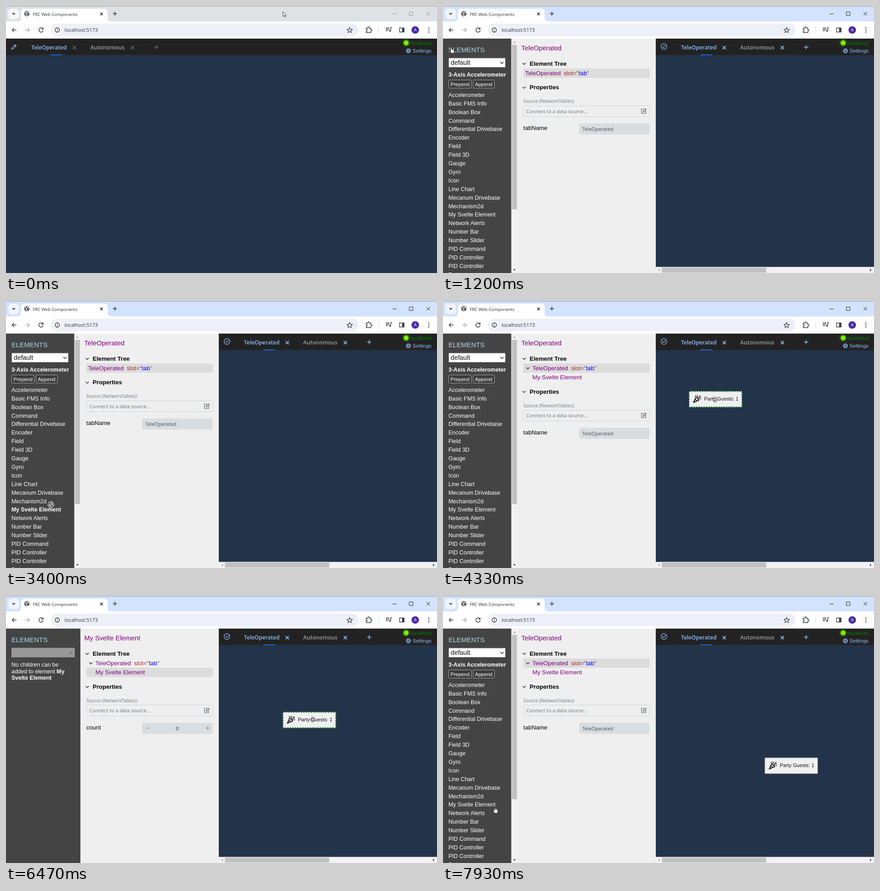
An HTML page that plays this animation: 950 by 590 pixels, repeating every 8 s.

```html
<!DOCTYPE html>
<html lang="en">
<head>
<meta charset="utf-8">
<title>Dashboard editor</title>
<style>
  html, body { margin: 0; width: 100%; height: 100%; overflow: hidden; background: #233349; }
  svg { display: block; width: 950px; height: 590px; }
  text { white-space: pre; font-family: "Liberation Sans", Arial, sans-serif; font-size: 13.1px; }
  .ui { font-family: "Open Sans", sans-serif; font-size: 10.9px; }
  .tab { font-family: "Open Sans", sans-serif; font-size: 12.1px; font-weight: 600; }
  .med { font-weight: 500; }
  .title { font-size: 14.8px; }
  .item { font-size: 12.45px; fill: #fff; }
  .small { font-size: 11.1px; }
  .side { font-size: 11.6px; }
  .bold { font-weight: bold; }
</style>
</head>
<body>
<svg viewBox="0 0 950 590">
  <defs>
    <filter id="glow" x="-1" y="-1" width="3" height="3"><feGaussianBlur stdDeviation="2"/></filter>
    <g id="arrow" fill="#fff" stroke="#222" stroke-width=".9">
      <path d="M.5 .5V11L3 8.7 4.8 12.7 6.5 12 4.8 8.1H8Z"/>
    </g>
    <g id="hand" fill="#fff" stroke="#111" stroke-width=".9" stroke-linejoin="round">
      <path d="M-1.3 7V.6Q0-1 1.3 .6V4Q2.6 3.2 3.3 4.5 4.6 3.8 5.2 5.2 6.5 5 6.5 6.4V9Q6 10.3 5.6 12.3H-.6Q-2-.2-4 7.3-4.4 5.4-2.7 6Z"/>
    </g>
    <g id="grab" fill="#fff" stroke="#222" stroke-width=".8" stroke-linejoin="round">
      <path d="M-2 5.8-5.2 1.6Q-5.2-.3-3.2 1L-4-3.5Q-3-5.2-2-3.5L-1.3-1-1-4.8Q.2-6.3 1-4.8V-1L2-4.2Q3.3-5.2 3.7-3.7L3.3 0 4.3-1.7Q5.5-2 5.4-.6L4 4V6Z"/>
    </g>
    <g id="nodrop" fill="none" stroke-linecap="round">
      <path id="ban" d="M-4.7 0A4.7 4.7 0 1 1 4.7 0A4.7 4.7 0 1 1-4.7 0M-3.2-3.2 3.2 3.2" stroke="#fff" stroke-width="4"/>
      <use href="#ban" style="stroke:#222"/>
      <path d="M-4.7 0A4.7 4.7 0 1 1 4.7 0A4.7 4.7 0 1 1-4.7 0M-3.2-3.2 3.2 3.2" stroke="#222" stroke-width="1.8"/>
    </g>
    <g id="move" fill="#fff" stroke="#222" stroke-width=".8" stroke-linejoin="round">
      <path d="M0-6.8 2.6-4H1V-1H4V-2.6L6.8 0 4 2.6V1H1V4H2.6L0 6.8-2.6 4H-1V1H-4V2.6L-6.8 0-4-2.6V-1H-1V-4H-2.6Z"/>
    </g>
  </defs>
  <g id="scene"></g>
  <g id="guest"></g>
  <use id="pointer"/>
</svg>
<script>
const LOOP = 8000, STEP = 1000 / 15;
const $ = id => document.getElementById(id);

const text = (x, y, s, fill, cls = '', extra = '') =>
  `<text x="${x}" y="${y}" fill="${fill}" class="${cls}" ${extra}>${s}</text>`;
const rect = (x, y, w, h, fill, extra = '') =>
  `<rect x="${x}" y="${y}" width="${w}" height="${h}" fill="${fill}" ${extra}/>`;
const line = (d, stroke, width = 1.4, extra = '') =>
  `<path d="${d}" fill="none" stroke="${stroke}" stroke-width="${width}" ${extra}/>`;
const shape = (d, fill) => `<path d="${d}" fill="${fill}"/>`;
const circle = (x, y, r, fill, extra = '') => `<circle cx="${x}" cy="${y}" r="${r}" fill="${fill}" ${extra}/>`;
const ring = (x, y, r, stroke, width = 1.4, extra = '') =>
  circle(x, y, r, 'none', `stroke="${stroke}" stroke-width="${width}" ${extra}`);
const group = (dx, dy, s) => `<g transform="translate(${dx} ${dy})">${s}</g>`;
const cross = (x, y, r, stroke, width) =>
  line(`M${x - r} ${y - r}l${2 * r} ${2 * r}m0 ${-2 * r}l${-2 * r} ${2 * r}`, stroke, width);
const plus = (x, y, r, stroke, width) => line(`M${x - r} ${y}h${2 * r}M${x} ${y - r}v${2 * r}`, stroke, width);
const chevron = (x, y, stroke, r = 3.5, width = 1.3) =>
  line(`M${x - r} ${y - r / 2}l${r} ${r} ${r} ${-r}`, stroke, width);

function browser(focused) {
  const strip = focused ? '#d3e3fd' : '#dee1e6', control = focused ? '#222' : '#929598', ink = '#3c4043';
  return rect(0, 0, 950, 34, strip) + rect(0, 0, 950, 1, focused ? '#8c9cb5' : '#9a9da2') +
    rect(5, 6, 24, 23, focused ? '#f0f5ff' : '#f6f7f9', 'rx="8"') + chevron(17, 17, '#222', 3, 1.6) +
    rect(0, 34, 950, 38, '#fff') +
    shape('M25 34Q33 34 33 26V14Q33 6 41 6H216Q224 6 224 14V26Q224 34 232 34Z', '#fff') +
    circle(46, 17, 6, '#5f6368') + line('M42 14q4 1 3 4t3 4M47 12q-1 3 4 3', '#fff', 1.3) +
    text(59, 21.5, 'FRC Web Components', '#2c2e31', 'ui', 'style="font-size:9.5px"') +
    cross(210.5, 17.5, 3, '#222', 1.4) + plus(240, 17, 4.5, '#333', 1.4) +
    line('M852 17.5h9', control, 1) + line('M889 13h8v8h-8z', control, 1) + cross(931, 17, 4, control, 1) +
    line('M23 53H14M18 48.5L13.5 53 18 57.5', ink, 1.5) + line('M42 53h9M47 48.5l4.5 4.5-4.5 4.5', '#aaadb1', 1.5) +
    line('M80.5 49.5A4.8 4.8 0 1 0 82 54', ink, 1.5) + shape('M82.5 47v5h-5z', ink) +
    rect(99, 39, 678, 28, '#edf0f9', 'rx="14"') + circle(113, 53, 9, '#fff') +
    ring(113, 53, 4.8, '#222') + line('M113 52.2v3.3M113 50v1.3', '#222', 1.3) +
    text(129, 57, 'localhost:5173', '#303235', 'ui') +
    line('M757.5 47.5l1.7 3.9 4.2.4-3.2 2.8 1 4.1-3.7-2.2-3.7 2.2 1-4.1-3.2-2.8 4.2-.4z', ink, 1.3) +
    line('M794 49h3.5q-.5-3 1.7-3t1.7 3h3.4v3.3q2.4-.2 2.4 1.5t-2.4 1.5v3.4H794v-3q2.3 0 2.3-1.8T794 52z', ink, 1.4) +
    rect(820.5, 46, 1, 13, '#c5d5f2') +
    line('M837 48.5h8M837 51.5h8M837 54.5h5M848 47v7.5M848 48h3', ink, 1.4) + circle(846.5, 55, 1.9, ink) +
    line('M867.5 48.5h10v9h-10z', ink, 1.4) + rect(873, 48, 5, 10, ink) +
    circle(902, 53, 8.3, '#4a2ba5') + text(902, 56.2, 'A', '#fff', 'ui', 'text-anchor="middle" style="font-size:9px"') +
    [48.5, 53, 57.5].map(y => circle(932, y, 1.3, ink)).join('');
}

function tabBar(editing, hovered) {
  const accent = '#8ebcfc', faint = editing ? accent : '#67696c', closing = editing ? 1.8 : 1.6;
  const pencil = line('M12.5 95.5l.6-2.9 7.2-7.2 2.3 2.3-7.2 7.2zM18.7 87l2.3 2.3', accent, 1.3);
  const done = ring(18, 89.5, 6.3, accent, 1.3) + line('M15 89.3l2.3 2.3 4.3-4.7', accent, 1.4);
  const teeth = ring(887, 99, 4.6, accent, 1.8, 'stroke-dasharray="2 1.6"');
  return rect(0, 72, 950, 36.5, '#222') + group(editing ? 469 : 0, 0,
    (hovered ? rect(0, 72, 36, 36.5, '#1c1f21') : '') + (editing ? done : pencil) +
    rect(36, 107.5, 278, 1, '#2b2e31') + rect(98, 107, 26, 1.7, '#1676f3') +
    text(55.5, 96, 'TeleOperated', accent, 'tab') + cross(151, 92, 3.6, faint, closing) +
    text(186, 96, 'Autonomous', '#9b9ea2', 'tab') + cross(279, 92, 3.6, faint, closing) +
    plus(331.5, 91, 4.8, faint, 1.6)) +
    circle(882, 81.5, 6.5, '#6f0', 'filter="url(#glow)" opacity=".6"') + circle(882, 81.5, 5.3, '#7cf000') +
    text(892, 85.5, 'localhost', '#008000', 'side') +
    ring(887, 99, 3.4, accent, 1.5) + circle(887, 99, 1.2, accent) + teeth +
    text(896, 102.5, 'Settings', accent, 'side');
}

const ELEMENTS = ['Accelerometer', 'Basic FMS Info', 'Boolean Box', 'Command', 'Differential Drivebase', 'Encoder',
  'Field', 'Field 3D', 'Gauge', 'Gyro', 'Icon', 'Line Chart', 'Mecanum Drivebase', 'Mechanism2d',
  'My Svelte Element', 'Network Alerts', 'Number Bar', 'Number Slider', 'PID Command', 'PID Controller',
  'PID Controller', 'Relay'];
const ROW = 18.9, FIRST_ROW = 187;

function sidebar(childSelected, hoverRow) {
  const head = rect(0, 72, 164, 518, '#444') + text(12, 102, 'ELEMENTS', '#add8e6', 'title');
  if (childSelected) {
    return head + rect(12, 114.5, 139.5, 21, '#989898') + chevron(143.5, 125.5, '#666') +
      text(12, 156, 'No children can be', '#fff', 'item') +
      text(12, 170.7, 'added to element <tspan class="bold">My</tspan>', '#fff', 'item') +
      text(12, 185.4, 'Svelte Element', '#fff', 'item bold');
  }
  const button = (x, w, s) => rect(x + .5, 163.5, w, 18, '#3b3b3b', 'rx="2.5" stroke="#a5a5a5"') +
    text(x + 4.5, 176.5, s, '#fff', 'small');
  return head + rect(12.5, 115, 125, 20.5, '#fff', 'stroke="#767676"') +
    text(17, 130, 'default', '#111', '', 'style="font-size:14.3px"') + chevron(130, 125.5, '#222') +
    text(12, 156, '3-Axis Accelerometer', '#fff', 'item bold') +
    button(12, 50, 'Prepend') + button(66, 47, 'Append') +
    ELEMENTS.map((s, i) => text(12, 200.8 + i * ROW, s, '#fff', i === hoverRow ? 'item bold' : 'item')).join('') +
    rect(150.5, 72, 13.5, 518, '#f2f2f2') + rect(152, 86, 11, 363, '#c1c1c1') +
    shape('M154.5 81.5l3-3.5 3 3.5z', '#a3a3a3') + shape('M154.5 581.5l3 3.5 3-3.5z', '#505050');
}

function inspector(hasChild, childSelected) {
  const shift = hasChild ? 20.5 : 0, indent = hasChild ? 197 : 181;
  const heading = (y, s) => chevron(179, y - 4, '#222') + text(191, y, s, '#000', 'bold');
  const field = rect(300, 259.5, 155.5, 24.5, '#d8dde2', 'rx="3"');
  const property = childSelected
    ? text(177, 274.2, 'count', '#000') + field + line('M308 271.5h8', '#7b858f', 1.2) +
      plus(444.5, 271.5, 4, '#7b858f', 1.2) + text(377.5, 276.5, '0', '#333b45', 'ui med', 'text-anchor="middle"')
    : text(177, 274.2, 'tabName', '#000') + field + text(307, 276, 'TeleOperated', '#414b57', 'ui med');
  return rect(164, 72, 305, 518, '#efefef') +
    text(172.5, 98, childSelected ? 'My Svelte Element' : 'TeleOperated', '#800080', 'title') +
    heading(131.5, 'Element Tree') + rect(177, childSelected ? 158.5 : 138, 279, 20.5, '#dcdcdc') +
    text(indent, 152.6, 'TeleOperated', '#800080') +
    text(indent + 85.3, 152.6, '<tspan fill="#a52a2a">slot=</tspan>"<tspan fill="#00f">tab</tspan>"', '#555') +
    (hasChild ? chevron(187, 148.5, '#222') + text(197, 173, 'My Svelte Element', '#800080') : '') +
    group(0, shift, heading(184.2, 'Properties') +
      text(177, 214, 'Source (NetworkTables):', '#6d7681', 'ui med', 'style="font-size:10.1px"') +
      rect(177.5, 220.5, 278, 24, 'none', 'rx="3" stroke="#bcc1c6" stroke-dasharray="2.5 1.5"') +
      text(183.5, 236.6, 'Connect to a data source...', '#69727d', 'ui med') +
      line('M444 227.5h-6.5v10h9.5v-5M441 234.5l.5-2.3 5-5 1.7 1.7-5 5z', '#59626c', 1.2) + property);
}

function scene(s) {
  let out = browser(s.focused) + rect(0, 72, 950, 518, '#233349') + tabBar(s.editing, s.hovered);
  if (s.editing) {
    out += sidebar(s.childSelected, s.hoverRow) + inspector(s.hasChild, s.childSelected) +
      rect(469, 576.5, 481, 13.5, '#f3f1f4') + rect(482.5, 578, 230, 11, '#c1c1c1') +
      shape('M478 580.5l-3.5 3 3.5 3z', '#a3a3a3') + shape('M941 580.5l3.5 3-3.5 3z', '#505050');
  }
  return out;
}

function guestButton(outlined) {
  const popper = line('M10 25.5L15.3 13 22.3 20.3ZM13.5 18l4.5 4M12 21.5l2.3 2.2', '#111', 1.7, 'stroke-linejoin="round"') +
    line('M17.5 14.5q2.5-2.2.5-5M20 16.5l5-6M21.5 18q2.5-2.5 5-.5M21 10.5v.1M14 9.7l1 1.3M24.5 14l1.7-.6', '#111', 1.4, 'stroke-linecap="round"');
  const edge = outlined
    ? rect(.8, 1, 115.8, 34, 'none', 'stroke="#fff" stroke-width="1.4"') +
      rect(.8, 1, 115.8, 34, 'none', 'stroke="#008000" stroke-width="1.4" stroke-dasharray="3.5 2"')
    : rect(.8, 1, 115.8, 34, 'none', 'stroke="#c4c6c8" rx="1"');
  return rect(.5, .5, 116.5, 35, '#f0f0f0') + edge + popper + text(33.5, 21.3, 'Party Guests: 1', '#111', '', 'style="font-size:11px"');
}

// Time, x, y and the pointer shape from that time on.
const POINTER = [
  [0, 610, 12, 'arrow'], [67, 610, 12, 'arrow'], [400, 132, 102, 'arrow'], [533, 132, 102, 'arrow'],
  [930, 18, 92, 'hand'], [1400, 18, 92, 'hand'], [1467, 20, 98, 'arrow'], [1933, 139, 265, 'arrow'],
  [2267, 112, 418, 'grab'], [2933, 100, 456, 'grab'], [3333, 100, 456, 'grab'], [3400, 99, 450, 'nodrop'],
  [3867, 600, 217, 'arrow'], [4267, 600, 217, 'arrow'], [4333, 600, 218, 'move'], [4667, 600, 221, 'move'],
  [5467, 600, 221, 'move'], [6000, 604, 211, 'move'], [6200, 604, 211, 'move'], [6467, 676, 273, 'move'],
  [7067, 775, 374, 'move'], [7200, 775, 374, 'move'], [7400, 700, 312, 'arrow'], [7600, 667, 280, 'arrow'],
  [7800, 667, 280, 'arrow'], [7933, 116, 474, 'grab'], [8000, 116, 474, 'grab']];
const GUEST = [[0, 542, 199], [6200, 542, 199], [6467, 610, 256], [7067, 709, 357], [8000, 709, 357]];

// Smooth monotone curve through the keys.
function sample(keys, t) {
  const last = keys.findLastIndex(k => k[0] <= t + 1), i = Math.min(last, keys.length - 2);
  const [a, b] = [keys[i], keys[i + 1]], span = b[0] - a[0], u = Math.min(1, Math.max(0, (t - a[0]) / span));
  const slope = (j, c) => keys[j] && keys[j + 1] ? (keys[j + 1][c] - keys[j][c]) / (keys[j + 1][0] - keys[j][0]) : 0;
  const tangent = (j, c) => {
    const p = slope(j - 1, c), q = slope(j, c);
    return p * q > 0 ? 2 * p * q / (p + q) : 0;
  };
  const at = c => a[c] + (b[c] - a[c]) * u * u * (3 - 2 * u) +
    span * u * (1 - u) * ((1 - u) * tangent(i, c) - u * tangent(i + 1, c));
  return { x: at(1), y: at(2), shape: keys[last][3] };
}

const ruler = document.createElement('canvas').getContext('2d');
ruler.font = '12.45px "Liberation Sans", Arial, sans-serif';
function rowUnder(p) {
  const row = Math.floor((p.y - FIRST_ROW) / ROW);
  return row in ELEMENTS && p.x < 12 + ruler.measureText(ELEMENTS[row]).width ? row : -1;
}

let shown = '';
function frame(now) {
  const t = Math.floor((now % LOOP + 5) / STEP) * STEP, from = ms => t >= ms - 5;
  const pointer = sample(POINTER, t), guest = sample(GUEST, t);
  const dragging = from(3400) && !from(3867);
  const state = {
    focused: from(1000), editing: from(1200), hovered: from(930) && !from(1200),
    hasChild: from(3930), childSelected: from(4930) && !from(7530),
    outlined: from(4330) && !from(7530),
    hoverRow: dragging ? 14 : from(1470) && !from(7900) ? rowUnder(pointer) : -1
  };
  const key = JSON.stringify(state);
  if (key !== shown) {
    shown = key;
    $('scene').innerHTML = scene(state);
    $('guest').innerHTML = state.hasChild ? guestButton(state.outlined) : '';
  }
  $('guest').setAttribute('transform', `translate(${guest.x} ${guest.y})`);
  $('pointer').setAttribute('href', '#' + pointer.shape);
  $('pointer').setAttribute('transform', `translate(${pointer.x} ${pointer.y})`);
  requestAnimationFrame(frame);
}
requestAnimationFrame(frame);
</script>
</body>
</html>
```
